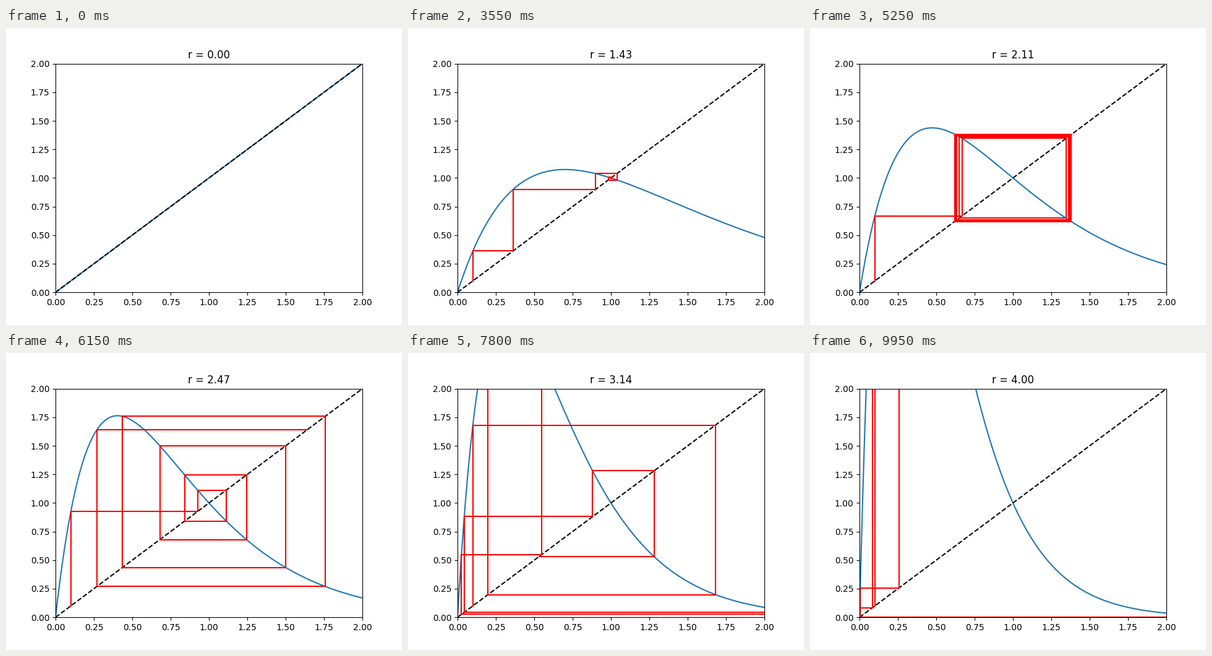
These frames come from a looping animation (640 by 480 pixels, 10 s). A matplotlib script:

```python
import numpy as np
import matplotlib.pyplot as plt
from matplotlib.animation import FuncAnimation

FRAMES = 200
INTERVAL = 50
STEPS = 10
START = 0.1
LIMIT = 2

rates = np.linspace(0, 4, FRAMES)
x = np.linspace(0, LIMIT, 200)


def ricker(n, r):
    return n * np.exp(r * (1 - n))


def cobweb(r):
    """Staircase between the diagonal and the map, from START."""
    n = START
    xs, ys = [n], [n]
    for _ in range(STEPS):
        following = ricker(n, r)
        xs += [n, following]
        ys += [following, following]
        n = following
    return xs, ys


fig, ax = plt.subplots(figsize=(6.4, 4.8), dpi=100)
curve, = ax.plot([], [], color="C0")
ax.plot([0, LIMIT], [0, LIMIT], "k--")
web, = ax.plot([], [], color="red")
ax.set_xlim(0, LIMIT)
ax.set_ylim(0, LIMIT)
title = ax.set_title("r = 0.00")


def update(frame):
    r = rates[frame]
    curve.set_data(x, ricker(x, r))
    web.set_data(*cobweb(r))
    title.set_text(f"r = {r:.2f}")
    return curve, web, title


anim = FuncAnimation(fig, update, frames=FRAMES, interval=INTERVAL, repeat=True)

plt.show()
```
